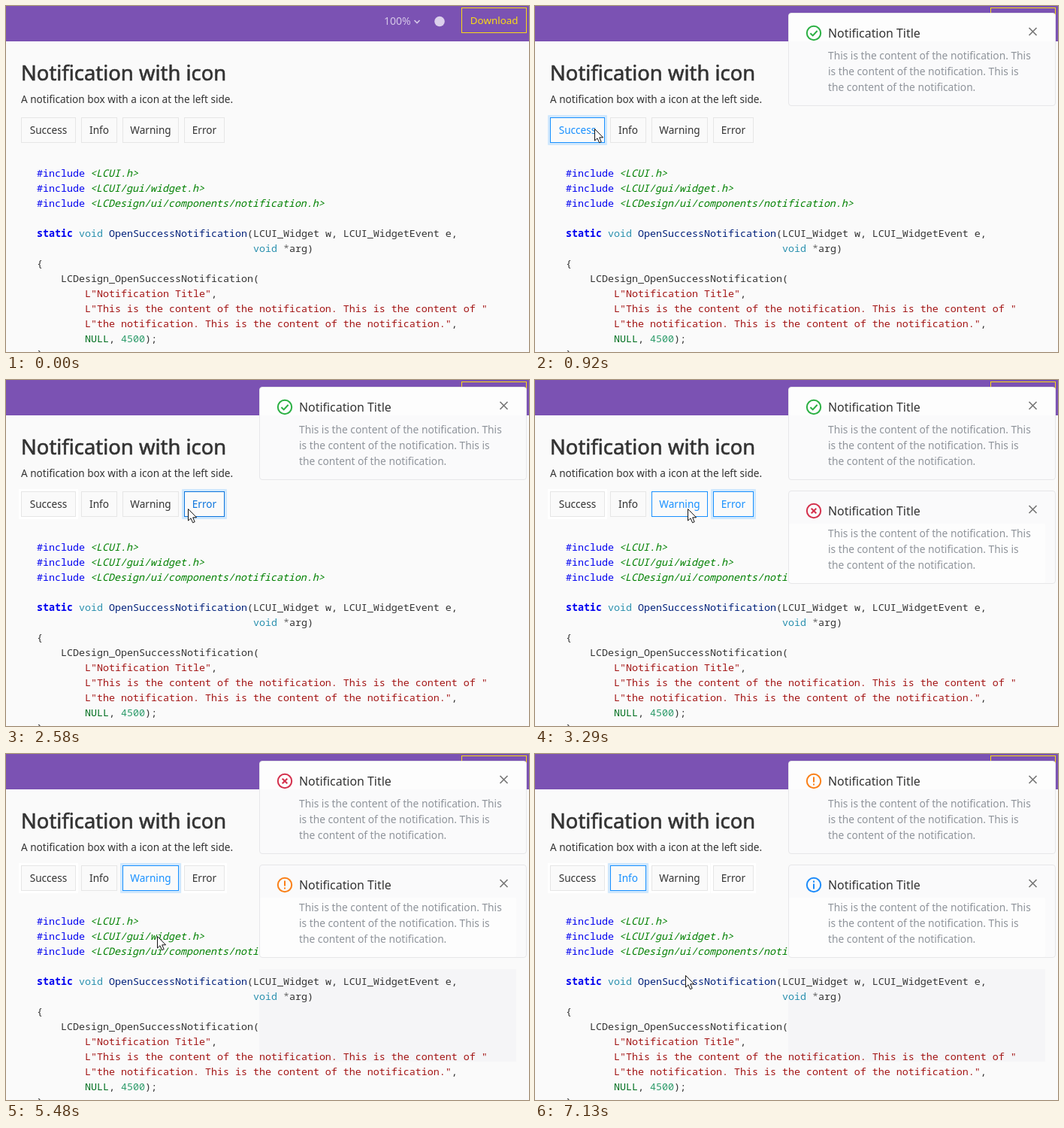
Write an HTML page that moves like this. It is 696 px wide and 460 px high and loops after 7990 ms.

```html
<!DOCTYPE html>
<html lang="en">
<head>
<meta charset="utf-8">
<title>Notification with icon</title>
<style>
  html, body { margin: 0; width: 100%; height: 100%; overflow: hidden; background: #fafafa; }
  svg { display: block; width: 696px; height: 460px; }
  text { font: 13.6px "Noto Sans", "Open Sans", sans-serif; fill: #333; white-space: pre; }
  .heading { font-size: 27.4px; stroke: #333; stroke-width: .6px; }
  .title { font-size: 15.9px; }
  .body { font-size: 13.75px; fill: #8f949b; }

  .code text { font: 13.333px "Noto Sans Mono", "DejaVu Sans Mono", monospace; }
  .pre { fill: #0000f0; }
  .inc { fill: #008000; font-style: italic; }
  .kw { fill: #0000f0; font-weight: bold; }
  .type { fill: #2b91af; }
  .fn { fill: #00207a; }
  .str { fill: #a31515; }
  .const { fill: #007020; }
  .num { fill: #2e9c6b; }
  .op { fill: #666; }

  .btn { --ink: #333; --line: #e6e6e6; --halo: none; }
  .btn .halo { fill: var(--halo); }
  .btn .box { fill: #fafafa; stroke: var(--line); }
  .btn text { fill: var(--ink); text-anchor: middle; }
  .btn.visited { --halo: #fff; }
  .btn.hot { --ink: #1890ff; --line: #1890ff; }
  .btn.focus { --halo: #d0e8fd; }
  .btn.pressed { --ink: #0b74dc; --line: #0b74dc; }

  .icon { fill: none; stroke-width: 2; }
  .hidden { visibility: hidden; }
</style>
</head>
<body>
<svg viewBox="0 0 696 460">
  <defs>
    <g id="success" class="icon" stroke="#2bb043"><circle r="9.2"/><path d="M-4.6 .2 L-1.3 3.4 L4.6 -3"/></g>
    <g id="error" class="icon" stroke="#d4304c"><circle r="9.2"/><path d="M-3.3 -3.3 L3.3 3.3 M3.3 -3.3 L-3.3 3.3"/></g>
    <g id="warning" class="icon" stroke="#fa8019"><circle r="9.2"/><path d="M0 -5.5 V1.6 M0 3.4 V5.6"/></g>
    <g id="info" class="icon" stroke="#1e8cfa"><circle r="9.2"/><path d="M0 -5.4 V-3.2 M0 -1.4 V5.4"/></g>
  </defs>

  <rect width="696" height="460" fill="#fafafa"/>
  <rect width="696" height="47" fill="#7b52b3"/>
  <text x="503" y="25" style="fill:#d5c7e8;font-size:14px">100%</text>
  <path d="M543.5 19 l3.5 3.5 l3.5 -3.5" fill="none" stroke="#d5c7e8" stroke-width="1.6"/>
  <circle cx="577" cy="20.5" r="6.8" fill="#dcd0ec"/>
  <rect x="606.5" y="2.5" width="86" height="33" fill="none" stroke="#fadb14"/>
  <text x="649.7" y="24" text-anchor="middle" style="fill:#fadb14;font-size:13.4px">Download</text>

  <rect id="slab" x="337" y="286" width="342" height="123" fill="#f5f5f7"/>

  <text class="heading" x="20" y="98.6">Notification with icon</text>
  <text x="20" y="129">A notification box with a icon at the left side.</text>

  <g class="code">
    <text x="41" y="227"><tspan class="pre">#include</tspan> <tspan class="inc" dx="-1">&lt;LCUI.h&gt;</tspan></text>
    <text x="41" y="247"><tspan class="pre">#include</tspan> <tspan class="inc" dx="-1">&lt;LCUI/gui/widget.h&gt;</tspan></text>
    <text x="41" y="267"><tspan class="pre">#include</tspan> <tspan class="inc" dx="-1">&lt;LCDesign/ui/components/notification.h&gt;</tspan></text>
    <text x="41" y="307"><tspan class="kw">static</tspan> <tspan class="type">void</tspan> <tspan class="fn">OpenSuccessNotification</tspan>(LCUI_Widget w, LCUI_WidgetEvent e,</text>
    <text x="329" y="327"><tspan class="type">void</tspan> <tspan class="op">*</tspan>arg)</text>
    <text x="41" y="347">{</text>
    <text x="73" y="367">LCDesign_OpenSuccessNotification(</text>
    <text x="105" y="387"><tspan class="str">L"Notification Title"</tspan>,</text>
    <text x="105" y="407"><tspan class="str">L"This is the content of the notification. This is the content of "</tspan></text>
    <text x="105" y="427"><tspan class="str">L"the notification. This is the content of the notification."</tspan>,</text>
    <text x="105" y="447"><tspan class="const">NULL</tspan>, <tspan class="num">4500</tspan>);</text>
    <text x="41" y="467">}</text>
  </g>

  <g id="buttons"></g>
  <g id="slots"></g>
  <circle id="click" r="11.5" fill="#f2ea14" fill-opacity=".78"/>
  <path id="cursor" d="M.5 .5 V16 L4 12.8 L6.6 18.7 L9.2 17.6 L6.7 11.8 H11.6 Z" fill="#fff" stroke="#111" stroke-linejoin="round"/>
</svg>

<script>
const LOOP = 7990;
const byId = id => document.getElementById(id);
const within = (t, [from, to]) => t >= from && t < to;

// x, width, and the spans of focus and press
const buttons = [
  { label: 'Success', x: 20, w: 73, focus: [840, 2500], press: [840, 920] },
  { label: 'Info', x: 100, w: 48, focus: [6500, LOOP], press: [6500, 6660] },
  { label: 'Warning', x: 155, w: 75, focus: [3370, 6500], press: [3370, 3530] },
  { label: 'Error', x: 237, w: 54, focus: [2500, 3370], press: [2500, 2660] },
];

const notices = [
  { icon: 'success', life: [920, 5480] },
  { icon: 'error', life: [2660, 7130] },
  { icon: 'warning', life: [3530, LOOP] },
  { icon: 'info', life: [6660, LOOP] },
];

const clicks = [[840, 920], [2500, 2580], [3370, 3450], [6500, 6660]];

// Pointer hops: start time, then one position about every 78 ms
const hops = [
  [70, [447, 318], [272, 228], [212, 205], [181, 200], [166, 190], [138, 185], [110, 180], [88, 168], [79, 163]],
  [1460, [92, 164], [112, 165], [124, 165]],
  [1860, [133, 166], [150, 168], [172, 170], [195, 171], [215, 171], [232, 171], [242, 171]],
  [3210, [224, 171], [203, 171]],
  [3610, [202, 208], [201, 242]],
  [6100, [198, 238], [186, 222], [165, 200], [143, 178], [132, 171]],
  [6740, [172, 238], [200, 294]],
];

byId('buttons').innerHTML = buttons.map(({ label, x, w }) => `
  <g class="btn">
    <rect class="halo" x="${x - 3}" y="145" width="${w + 6}" height="40" rx="1"/>
    <rect class="box" x="${x + .5}" y="148.5" width="${w - 1}" height="33"/>
    <text x="${x + w / 2}" y="170">${label}</text>
  </g>`).join('');

const lines = ['This is the content of the notification. This',
  'is the content of the notification. This is', 'the content of the notification.'];

// Lighter patch inside the card of each slot
const patches = [
  { y: 1, w: 354, h: 37 },
  { y: 44, w: 341, h: 79 },
  { y: 1, w: 341, h: 122 },
];

byId('slots').innerHTML = patches.map(({ y, w, h }, i) => `
  <g transform="translate(337 ${9 + i * 138})">
    <rect x=".5" y=".5" width="355" height="123" rx="3.5" fill="#fafafb"/>
    <rect x="1" y="${y}" width="${w}" height="${h}" rx="3" fill="#fdfdfd"/>
    <rect x=".5" y=".5" width="355" height="123" rx="3.5" fill="none" stroke="#e7e7e9"/>
    <use x="34" y="27"/>
    <text class="title" x="53" y="33">Notification Title</text>
    ${lines.map((line, n) => `<text class="body" x="53" y="${62 + n * 21}">${line}</text>`).join('')}
    <path d="M320.5 20 l10 10 m0 -10 l-10 10" stroke="#777" stroke-width="1.7"/>
  </g>`).join('');

const buttonEls = [...byId('buttons').children];
const slotEls = [...byId('slots').children];
const show = (el, on) => el.classList.toggle('hidden', !on);

function pointerAt(t) {
  const hop = hops.filter(([start]) => t >= start).pop();
  if (!hop) return null;
  const [start, ...points] = hop;
  const step = Math.floor((t - start + 2) / 77.7);
  return points[Math.min(step, points.length - 1)];
}

function render(t) {
  const pointer = pointerAt(t);
  const [px, py] = pointer || [-50, -50];

  buttons.forEach(({ x, w, focus, press }, i) => {
    const focused = within(t, focus);
    const hovered = px >= x && px < x + w && py >= 148 && py < 182;
    const { classList } = buttonEls[i];
    classList.toggle('hot', focused || hovered);
    classList.toggle('focus', focused);
    classList.toggle('visited', t >= focus[1]);
    classList.toggle('pressed', within(t, press));
  });

  const open = notices.filter(({ life }) => within(t, life));
  slotEls.forEach((el, i) => {
    show(el, open[i]);
    if (open[i]) el.querySelector('use').setAttribute('href', '#' + open[i].icon);
  });
  show(byId('slab'), t >= 5480);

  const place = (id, x, y) => byId(id).setAttribute('transform', `translate(${x} ${y})`);
  place('cursor', px, py);
  place('click', px + 1, py);
  show(byId('click'), clicks.some(span => within(t, span)));
}

const origin = performance.now();
function tick() {
  render((performance.now() - origin) % LOOP);
  requestAnimationFrame(tick);
}
tick();
</script>
</body>
</html>
```
